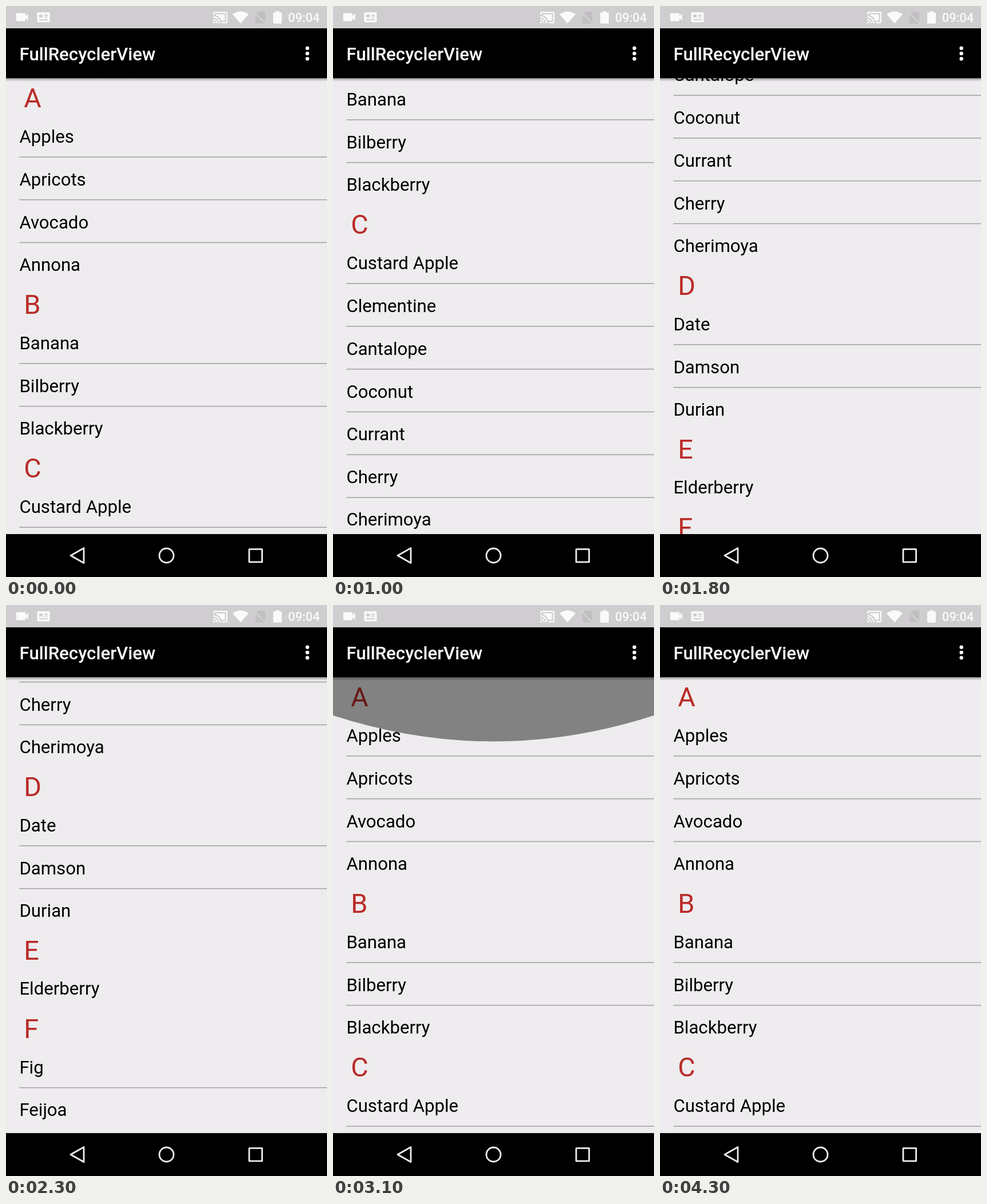
These frames come from a looping animation (561x998 px, 5.1 s). An HTML page:

```html
<!DOCTYPE html>
<html lang="en">
<head>
<meta charset="utf-8">
<title>Fruit list</title>
<style>
  html, body { margin: 0; width: 100%; height: 100%; overflow: hidden; background: #eeecee; }
  svg { display: block; width: 561px; height: 998px; font-family: Roboto, sans-serif; }
  .item { font-size: 31.17px; }
  .head { font-size: 46.75px; fill: #b92b27; }
  .line { fill: #a09fa0; }
  .title { font-size: 31.17px; font-weight: 500; fill: #fff; }
  .clock { font-size: 21.8px; font-weight: 500; }
  .icons { fill: #fafafa; }
  .nav { fill: none; stroke: #eee; stroke-width: 2.8; }
</style>
</head>
<body>
<svg viewBox="0 0 561 998">
  <defs>
    <linearGradient id="shade" x2="0" y2="1">
      <stop stop-opacity=".34"/>
      <stop offset="1" stop-opacity="0"/>
    </linearGradient>
  </defs>
  <rect width="561" height="998" fill="#eeecee"/>
  <g id="list"></g>
  <path id="glow"/>
  <rect y="126" width="561" height="6" fill="url(#shade)"/>

  <rect width="561" height="39.5" fill="#cfcdcf"/>
  <g class="icons">
    <path transform="translate(14.5 5.7) scale(1.15)" d="M17 10.5V7q0-1-1-1H4q-1 0-1 1v10q0 1 1 1h12q1 0 1-1v-3.5l4 4v-11z"/>
    <rect x="54.5" y="11" width="22" height="17.5" rx="2"/>
    <path fill="#cfcdcf" d="M58 15h6v5h-6zM67 15h6v2h-6zM67 18.5h6v1.8h-6zM58 23h15v2h-15z"/>
    <path transform="translate(361 6.5) scale(1.13)" d="M1 18v3h3a3 3 0 0 0-3-3zm0-4v2a5 5 0 0 1 5 5h2a7 7 0 0 0-7-7zm18-7H5v1.6a13 13 0 0 1 8.4 8.4H19zM1 10v2a9 9 0 0 1 9 9h2A11 11 0 0 0 1 10zM21 3H3a2 2 0 0 0-2 2v3h2V5h18v14h-7v2h7a2 2 0 0 0 2-2V5a2 2 0 0 0-2-2z"/>
    <path d="M396 14.5Q410 4.500 424 14.500L410 30.500z"/>
    <path fill="#c1bfc1" d="M441 10h10q2 0 2 2v17q0 1.500-2 1.500h-13q-2 0-2-2V15z"/>
    <path stroke="#d6d4d6" stroke-width="2" d="M434 11l19 19"/>
    <path d="M471.500 9h6v2.300h3q1.500 0 1.500 1.500v16.500q0 1.500-1.500 1.500h-12q-1.500 0-1.500-1.500V12.800q0-1.500 1.500-1.500h3z"/>
    <text class="clock" x="493" y="28">09:04</text>
  </g>

  <rect y="39" width="561" height="87.200"/>
  <text class="title" x="23.600" y="95">FullRecyclerView</text>
  <g fill="#fff">
    <circle cx="526.700" cy="73.700" r="3.200"/>
    <circle cx="526.700" cy="83" r="3.200"/>
    <circle cx="526.700" cy="92.300" r="3.200"/>
  </g>

  <rect y="923" width="561" height="75"/>
  <g class="nav">
    <path stroke-linejoin="round" d="M113 960.500L136 947.500V973.500z"/>
    <circle cx="280.500" cy="960.500" r="12.500"/>
    <rect x="425" y="949.300" width="22.600" height="22.600" rx=".5"/>
  </g>
</svg>
<script>
const LOOP = 5100, STEP = 100, ROW = 74.8, GROUP_GAP = 136.6;
const groups = [
  'Apples,Apricots,Avocado,Annona',
  'Banana,Bilberry,Blackberry',
  'Custard Apple,Clementine,Cantalope,Coconut,Currant,Cherry,Cherimoya',
  'Date,Damson,Durian',
  'Elderberry',
  'Fig,Feijoa'
];
// Scroll offsets, one per step, from the given start times
const scrollDown = { start: 700, at: [60, 190, 325, 426, 490, 535, 565, 607, 700, 785, 850, 904.6, 952, 995, 1030, 1058, 1075.6] };
const scrollUp = { start: 2800, at: [960, 560, 170, 0] };

const list = document.getElementById('list');
const glow = document.getElementById('glow');

function add(tag, attrs, text = '') {
  const node = document.createElementNS('http://www.w3.org/2000/svg', tag);
  for (const key in attrs) node.setAttribute(key, attrs[key]);
  node.textContent = text;
  list.append(node);
}

let baseline = 239;
for (const group of groups) {
  const names = group.split(',');
  add('text', { class: 'head', x: 31.2, y: baseline - 62 }, names[0][0]);
  names.forEach((name, i) => {
    const last = i === names.length - 1;
    add('text', { class: 'item', x: 23.4, y: baseline - (last ? 0.7 : 0) }, name);
    if (!last) add('rect', { class: 'line', x: 23.4, y: baseline + 24.1, width: 538, height: 1.5 });
    baseline += last ? GROUP_GAP : ROW;
  });
}

function scrollAt(time) {
  const run = time < scrollUp.start ? scrollDown : scrollUp;
  const i = Math.floor((time - run.start) / STEP);
  return i < 0 ? 0 : run.at[Math.min(i, run.at.length - 1)];
}

// Overscroll glow: full at the edge hit, then recedes with deceleration
function glowAt(time) {
  if (time < 3100 || time >= 3500) return 0;
  return (1 - Math.max(0, time - 3114) / 600) ** 2;
}

function draw(now) {
  const time = Math.floor(now % LOOP / STEP) * STEP;
  list.setAttribute('transform', `translate(0 ${-scrollAt(time)})`);
  const size = glowAt(time);
  const edge = 126 + 67 * size, control = 126 + 158 * size;
  glow.setAttribute('d', `M0 126V${edge}Q280.5 ${control} 561 ${edge}V126z`);
  glow.setAttribute('fill-opacity', 0.45 * size);
  requestAnimationFrame(draw);
}
draw(performance.now());
</script>
</body>
</html>
```
